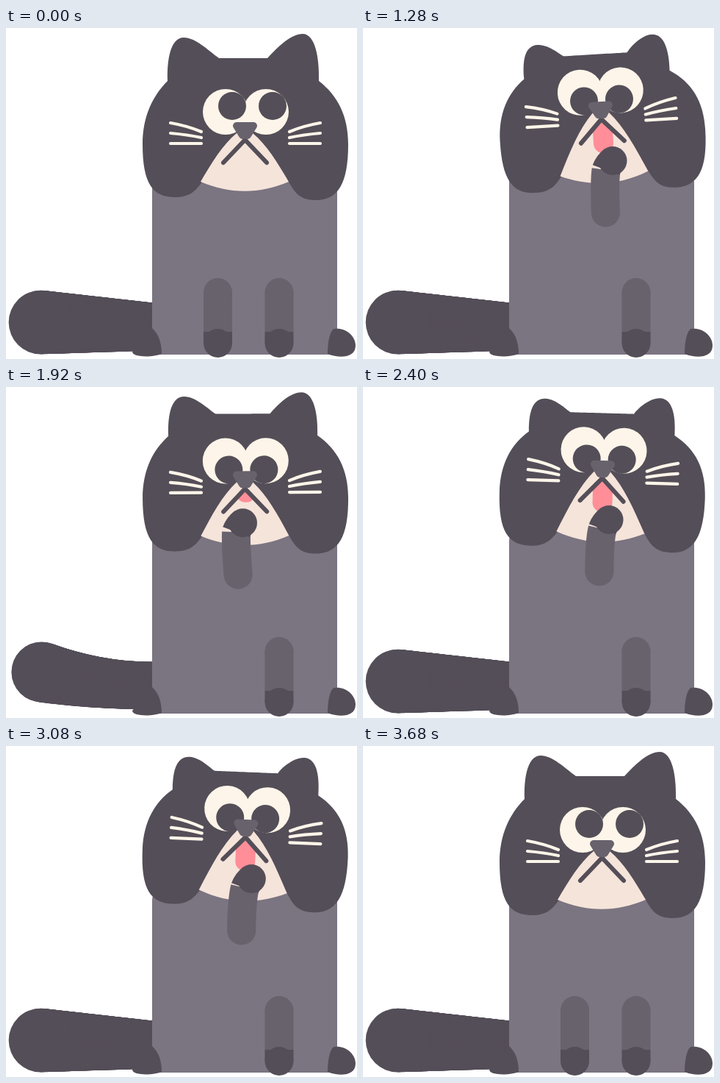
An HTML page with a canvas for the animation above (3.76 s loop, 478 by 450 pixels).

```html
<!DOCTYPE html>
<html lang="en">
<head>
<meta charset="utf-8">
<title>Cat washing its paw</title>
<style>
html, body { margin: 0; width: 100%; height: 100%; overflow: hidden; background: #fff; }
canvas { display: block; }
</style>
</head>
<body>
<canvas id="stage" width="478" height="450"></canvas>
<script>
const ctx = document.getElementById('stage').getContext('2d');
const LOOP = 3760, AXIS = 326;
const FUR = '#544e58', BODY = '#7b7481', LEG = '#68626d';
const CREAM = '#fdf5e9', MUZZLE = '#f5e4da', PINK = '#ff8e98';

const LICKS = [
  { begin: 960, peak: 1240, end: 1400, tilt: -3.4 },
  { begin: 1560, peak: 1760, end: 1870, tilt: -.3 },
  { begin: 2160, peak: 2370, end: 2520, tilt: 1.6 },
  { begin: 2720, peak: 3040, end: 3160, tilt: 2.3 }
];

// The two halves of the head differ a little
const SIDES = [
  { dir: -1, ear: 0, tip: 0, lobe: 0 },
  { dir: 1, ear: -6, tip: -5, lobe: 4 }
];

// Half outlines as [distance from the axis, y], cubic curves
const HALF_HEAD = [[59, 209], [68, 222], [76, 230], [96, 230], [126, 230], [140, 212], [140, 158],
  [140, 120], [126, 92], [106, 72], [107, 40], [101, 13], [84, 13], [68, 13], [51, 30], [36, 41]];
const HALF_SNOUT = [[11, 143], [31, 160], [44, 182], [60, 209], [20, 226]];

const mix = (a, b, k) => a + (b - a) * k;

function ease(t, from, to) {
  const p = Math.min(1, Math.max(0, (t - from) / (to - from)));
  return p * p * (3 - 2 * p);
}

function pose(t) {
  let up = 0, tilt = 0, last = 0;
  for (const lick of LICKS) {
    const rise = ease(t, lick.begin, lick.peak);
    up += rise - ease(t, lick.end, lick.end + 90);
    tilt += rise * (lick.tilt - last);
    last = lick.tilt;
  }
  const back = ease(t, 3320, 3620);
  return {
    up,
    tilt: tilt * (1 - back),
    raise: ease(t, 960, 1240) - back,
    look: ease(t, 960, 1200) - back,
    wag: ease(t, 1360, 1840) - ease(t, 1840, 2320),
    lid: mix(mix(80, 135.5, ease(t, 400, 850)), 78, ease(t, 960, 1160))
  };
}

function fill(color, path) {
  ctx.fillStyle = color;
  ctx.fill(path);
}

function line(color, width, cap, d) {
  ctx.strokeStyle = color;
  ctx.lineWidth = width;
  ctx.lineCap = cap;
  ctx.lineJoin = 'round';
  ctx.stroke(new Path2D(d));
}

function circle(x, y, r, color) {
  const path = new Path2D();
  path.arc(x, y, r, 0, 7);
  fill(color, path);
}

function box(x, y, w, h, radii, color) {
  const path = new Path2D();
  path.roundRect(x, y, w, h, radii);
  fill(color, path);
}

const curve = pts => new Path2D(`M${pts[0]}C${pts.slice(1).join(' ')}Z`);

function tail(wag) {
  for (let s = 0; s <= 1; s += .01) {
    const y = 406 - mix(6 * s, 20 * s * s, wag);
    const r = 32.5 + 11 * s ** (1 + .8 * wag) - 2.5 * wag * s;
    circle(mix(199, 45.5, s) + 1.5 * wag * s, y, r, FUR);
  }
}

function leg([elbow, bend, wrist, curl, paw]) {
  line(LEG, 39, 'butt', `M${elbow}Q${bend} ${wrist}`);
  circle(...elbow, 19.5, LEG);
  line(FUR, 39, 'butt', `M${wrist}Q${curl} ${paw}`);
  circle(...paw, 19.5, FUR);
}

const restingLeg = x => [359.5, 386, 413, 421, 428.5].map(y => [x, y]);

function lickingLeg(up, tilt) {
  const low = 1 - up, dy = 7 * low;
  const ex = 324.6 - 1.7 * tilt - 15 * low;
  const wx = 327.6 - tilt - 24 * low, wy = 193 + dy;
  return [[ex, 251 + dy], [mix(ex, wx, .5) - 2, 210 + dy], [wx, wy],
    [wx + 3, wy - 8], [wx + 9, wy - 12.5]];
}

function eyes(look, lid) {
  for (const x of [299, 354]) circle(x, 114, 31, CREAM);
  for (const x of [299, 354]) {
    const inward = x < AXIS ? 4.5 : -2.5;
    circle(x + mix(9, inward, look), 114 + mix(-8, 12, look), 19, FUR);
  }
  if (lid > 82) box(266, 80, 122, lid - 80, 0, FUR);
}

function whiskers() {
  for (const { dir } of SIDES)
    for (let i = 0; i < 3; i++) {
      const inner = 141 + 8 * i, outer = 129 + 14 * i;
      line(CREAM, 4.2, 'round', `M${AXIS + dir * 102} ${outer}
        Q${AXIS + dir * 79} ${mix(outer, inner, .5) - 2 + i} ${AXIS + dir * 60} ${inner}`);
    }
}

function mouth(up) {
  ctx.save();
  ctx.clip(new Path2D('M326 152L296 183V260H356V183Z'));
  box(313, 100, 27, 52 + 46 * up, 13, PINK);
  ctx.restore();
  line(FUR, 6, 'round', 'M296 183L325.5 152L355 183');
  const nose = 'M314 133H337L329 146H322Z';
  line(LEG, 10, 'round', nose);
  fill(LEG, new Path2D(nose));
}

// Looking up squashes the ears and lifts the cheeks
function headPoint([d, y], side, up) {
  const isEar = y < 75, isTip = y < 35;
  const dx = y === 41 ? 10 : isEar ? -.035 * d : 0;
  const dy = isTip ? 5 : -5.5 - 6 * Math.min(1, (y - 41) / 60);
  const shift = isTip ? side.tip : y > 220 ? side.lobe : 0;
  return [AXIS + side.dir * (d + dx * up + (isEar ? side.ear : 0)), y + dy * up + shift];
}

const snoutPoint = ([d, y], side, up) =>
  [AXIS - 1 + side.dir * d, y + up * Math.min(-11, -28 + 17 * (y - 143) / 66)];

function outline(half, place, up) {
  return SIDES.map(side => half.map(p => place(p, side, up)));
}

function head({ up, tilt, look, lid }) {
  ctx.save();
  ctx.translate(AXIS, 140 - 10 * up * (1 - up));
  ctx.rotate(tilt * Math.PI / 180);
  ctx.translate(-AXIS, -140);

  const [left, right] = outline(HALF_HEAD, headPoint, up);
  right.reverse();
  fill(FUR, curve([...left, left.at(-1), right[0], ...right]));

  const inFace = draw => {
    ctx.save();
    ctx.translate(0, -28 * up);
    draw();
    ctx.restore();
  };
  inFace(() => {
    eyes(look, lid);
    whiskers();
  });
  const [from, to] = outline(HALF_SNOUT, snoutPoint, up);
  fill(MUZZLE, curve([...from, ...to.reverse()]));
  inFace(() => mouth(up));
  ctx.restore();
}

function draw(t) {
  const now = pose(t);
  ctx.clearRect(0, 0, 478, 450);
  tail(now.wag);
  box(199, 188, 252, 256, [22, 22, 0, 0], BODY);
  fill(FUR, new Path2D('M199 408Q212 420 212 443C200 448 172 448 172 440Z'));
  fill(FUR, new Path2D('M438 443C438 425 442 410 447 409C462 407 476 418 476 432C476 448 455 450 438 443Z'));
  leg(restingLeg(372));
  head(now);
  const rest = restingLeg(288.5), lick = lickingLeg(now.up, now.tilt);
  leg(rest.map(([x, y], i) => [mix(x, lick[i][0], now.raise), mix(y, lick[i][1], now.raise)]));
}

const start = performance.now();
function tick() {
  draw((performance.now() - start) % LOOP);
  requestAnimationFrame(tick);
}
tick();
</script>
</body>
</html>
```
